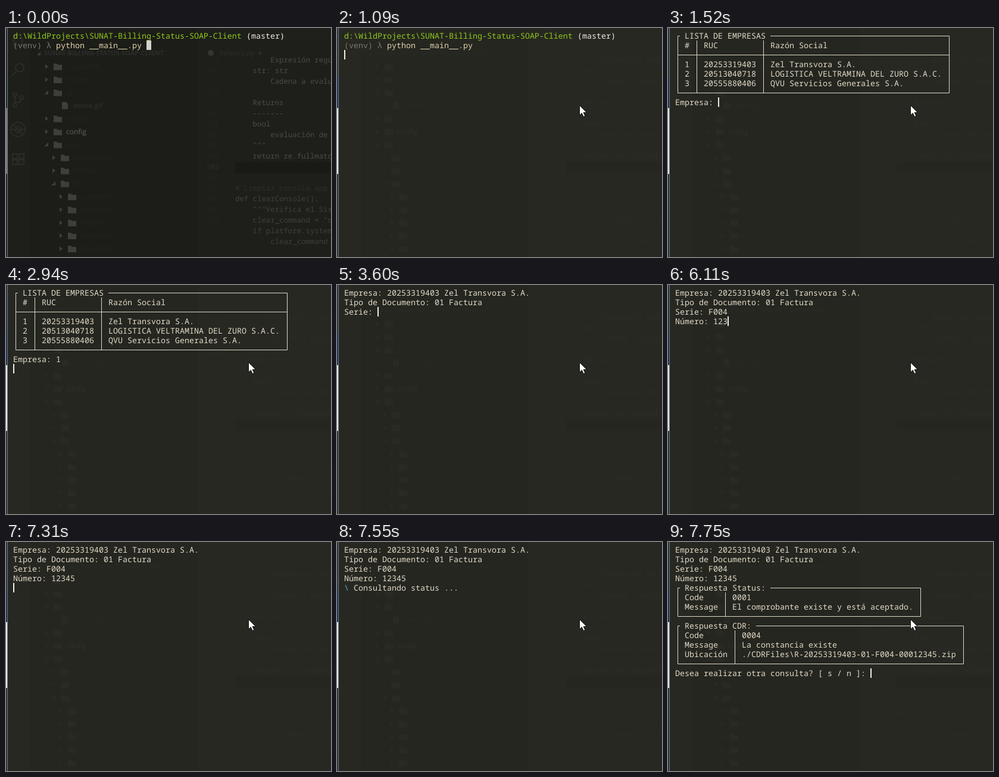
Animation of 546x386 px, one loop 8000 ms. Source, as an HTML page:

```html
<!DOCTYPE html>
<html lang="es">
<head>
<meta charset="utf-8">
<title>Consulta de comprobantes</title>
<style>
  html, body { margin: 0; width: 100%; height: 100%; overflow: hidden; background: #272822; }
  svg { display: block; }
  text { white-space: pre; font-family: "Noto Sans Mono", monospace; text-rendering: geometricPrecision; }
  #screen { font-size: 13.3333px; }
  #code text { font-size: 12.35px; }
  #tree text { font-family: "Open Sans", sans-serif; font-size: 12px; }
  #tree .root { font-size: 11px; font-weight: 700; }
</style>
</head>
<body>
<svg width="546" height="386" viewBox="0 0 546 386">
  <rect id="shade" width="546" height="386"/>
  <g id="ghost">
    <path d="M40 0h282v386h-282z" fill="#1c1d19"/>
    <path d="M385 226h161v19h-161z" fill="#191a16"/>
    <g fill="none" stroke="#2b2c27" stroke-width="2">
      <path d="M13 11h9l5 5v13h-14z"/>
      <circle cx="23" cy="67" r="7"/><path d="M18 72l-9 10"/>
      <circle cx="15" cy="112" r="3"/><circle cx="15" cy="130" r="3"/><circle cx="26" cy="117" r="3"/>
      <path d="M15 115v12M26 120q0 5-11 6"/>
      <circle cx="20" cy="171" r="12"/><circle cx="20" cy="171" r="5"/><path d="M12 163l16 16M9 171h22"/>
      <path d="M11 212h8v8h-8zM11 222h8v8h-8zM22 222h8v8h-8zM22 212h8v8h-8z"/>
    </g>
    <g id="tree"></g>
    <g id="code"></g>
    <circle cx="344" cy="42" r="5" fill="#34352f"/>
    <circle cx="466" cy="15" r="5" fill="#23241f"/>
  </g>
  <g id="edge">
    <path d="M0 0h2v386h-2z" fill="#2c333b"/>
    <path d="M0 81h2v54h-2z" fill="#1b3654"/>
    <path d="M0 135h2v111h-2z" fill="#e2e8e8"/>
  </g>
  <path d="M2.5 0v386" stroke="#6c7785"/>
  <g id="screen"></g>
  <path id="pointer" d="M407.5 130.5v16.5l3.8-3.6 2.8 6.1 2.7-1.2-2.7-5.9h5.3z" fill="#fff" stroke="#111"/>
</svg>
<script>
const LOOP = 8000;
const INK = '#e1d9c6', GREEN = '#8fc91a', GREY = '#77776c', SAND = '#dfd0aa', BLUE = '#62a5c9';
const $ = id => document.getElementById(id);
const esc = s => s.replace(/&/g, '&amp;').replace(/</g, '&lt;');
const label = (x, y, s, fill, attrs = '') =>
  `<text x="${x}" y="${y}" fill="${fill}" ${attrs}>${esc(s)}</text>`;

// Faint editor behind the terminal: [indent level, name, tint]
const FAINT = '#23241f', DIM = '#2d2e29', ICON = '#3e3f39';
const tree = [
  [0, '__pycache__'], [0, 'models'], [0, 'art'], [1, 'demo.gif', '#33342e'], [0, 'models'],
  [0, 'config', '#63645b'], [0, 'venv'], [1, 'services.doc'], [1, 'Include'], [1, 'Lib'],
  [2, '__pycache__'], [2, 'collections'], [2, 'helpers'], [2, 'mappings'], [2, 'importlib']
];
const isFile = name => name.includes('.gif');
$('tree').innerHTML = label(64, 46, 'SUNAT-BILLING-STATUS-SOAP-CLIENT', DIM, 'class="root"') +
  label(359, 46, 'helpers.py  ●', DIM) + label(477, 19, 'SUNATServices.py', FAINT) +
  `<path d="M58 40v6h-6z" fill="${ICON}"/>` +
  tree.map(([level, name, tint = FAINT], i) => {
    const x = 80 + level * 12, y = 65 + i * 21.93;
    const open = tree[i + 1]?.[0] > level;
    const arrow = open ? `M${x - 9} ${y - 4}v7h-7z` : `M${x - 14} ${y - 4}l5 4-5 4z`;
    const icon = isFile(name) ? `M${x + 2} ${y - 6}h7l3 3v9h-10z`
      : `${arrow}M${x} ${y - 5}h5l2 2h7v9h-14z`;
    return `<path d="${icon}" fill="${ICON}"/>` + label(x + 21, y + 4, name, tint);
  }).join('');

const FIRST_LINE = 95, CURRENT_LINE = 105;
const code = [
  '        Expresión regular', '    str: str', '        Cadena a evaluar', '', '    Returns',
  '    -------', '    bool', '        evaluación de la', '    """', '    return re.fullmatch(', '', '',
  '# Limpiar consola app', 'def clearConsole():', '    """Verifica el Sistema',
  '    clear_command = "clear"', '    if platform.system() ==', '        clear_command = "cls"'
];
$('code').innerHTML = code.map((s, i) => {
  const y = 58 + i * 18, line = FIRST_LINE + i;
  return label(358, y, String(line), line === CURRENT_LINE ? DIM : FAINT, 'text-anchor="end"') +
    label(385, y, s, s.startsWith('#') ? DIM : i < 10 ? '#4a4b43' : '#3f403a');
}).join('');

// Terminal grid: 8 x 16 cells
const px = col => 12 + col * 8, py = row => 5 + row * 16;
const midX = col => px(col) + 4.5, midY = row => py(row) + 8.5;
const put = (row, s, col = 0, fill = INK) => label(px(col), py(row) + 13, s, fill);
const cursor = (col, row, width = 2, fill = '#eeeee6') =>
  `<rect x="${px(col)}" y="${py(row)}" width="${width}" height="16" fill="${fill}"/>`;

function table(top, title, rows, header = false) {
  const bottom = top + rows.length + (header ? 2 : 1);
  const rowAt = i => top + 1 + i + (header && i ? 1 : 0);
  let col = 2, out = put(top, title, 2), seps = '';
  rows[0].forEach((_, c) => {
    out += rows.map((r, i) => put(rowAt(i), r[c], col)).join('');
    const edge = col + Math.max(...rows.map(r => r[c].length)) + 1;
    if (c < rows[0].length - 1) seps += `M${midX(edge)} ${py(top + 1)}V${midY(bottom)}`;
    col = edge + 2;
  });
  const left = midX(0), right = midX(col - 2);
  const rule = header ? `M${left} ${midY(top + 2)}H${right}` : '';
  return out + `<path fill="none" stroke="${INK}" d="M${px(1)} ${midY(top)}H${left}V${midY(bottom)}H${right}` +
    `V${midY(top)}H${px(title.length + 3)}${seps}${rule}"/>`;
}

const ask = (body, row, prompt, value = '', showCursor = true) =>
  body + put(row, prompt + value) + (showCursor ? cursor(prompt.length + value.length, row) : '');
const enter = (body, row, s) => body + put(row, s) + cursor(0, row + 1);

const RUC = '20253319403', COMPANY = 'Zel Transvora S.A.';
const shell = put(0, 'd:\\WildProjects\\SUNAT-Billing-Status-SOAP-Client', 0, GREEN) +
  put(0, '(master)', 49, '#f0eadb') + put(1, '(venv) λ', 0, GREY) + put(1, 'python __main__.py', 9, SAND);
const companies = table(0, 'LISTA DE EMPRESAS', [
  ['#', 'RUC', 'Razón Social'],
  ['1', RUC, COMPANY],
  ['2', '20513040718', 'LOGISTICA VELTRAMINA DEL ZURO S.A.C.'],
  ['3', '20555880406', 'QVU Servicios Generales S.A.']
], true);
const company = put(0, `Empresa: ${RUC} ${COMPANY}`);
const kinds = company + table(1, 'TIPOS DE DOCUMENTO', [
  ['#', 'Id', 'Descripción'],
  ['1', '01', 'Factura'],
  ['2', '03', 'Boleta de Venta'],
  ['3', '07', 'Nota de Crédito'],
  ['4', '08', 'Nota de Débito']
], true);
const kind = company + put(1, 'Tipo de Documento: 01 Factura');
const serie = kind + put(2, 'Serie: F004');
const numbered = serie + put(3, 'Número: 12345');
const spin = glyph => numbered + put(4, glyph, 0, BLUE) + put(4, 'Consultando status ...', 2);
const result = numbered + table(4, 'Respuesta Status:', [
  ['Code', '0001'],
  ['Message', 'El comprobante existe y está aceptado.']
]) + table(8, 'Respuesta CDR:', [
  ['Code', '0004'],
  ['Message', 'La constancia existe'],
  ['Ubicación', `./CDRFiles\\R-${RUC}-01-F004-00012345.zip`]
]);
const typing = (body, row, prompt, value, times) =>
  times.map((at, i) => [at, ask(body, row, prompt, value.slice(0, i + 1))]);

const steps = [
  [0, shell + cursor(28, 1, 8, '#d2d2ca')],
  [100, shell + cursor(28, 1)],
  [970, shell],
  [1090, shell + cursor(0, 2)],
  [1520, ask(companies, 7, 'Empresa: ')],
  [2070, ask(companies, 7, 'Empresa: ', '', false)],
  [2620, ask(companies, 7, 'Empresa: ', '1')],
  [2940, enter(companies, 7, 'Empresa: 1')],
  [3070, ask(kinds, 9, 'Tipo de Documento: ')],
  [3370, ask(kinds, 9, 'Tipo de Documento: ', '1')],
  [3600, ask(kind, 2, 'Serie: ')],
  [4130, ask(kind, 2, 'Serie: ', '', false)],
  ...typing(kind, 2, 'Serie: ', 'F004', [4350, 4580, 4800, 5020]),
  [5340, ask(serie, 3, 'Número: ')],
  ...typing(serie, 3, 'Número: ', '12345', [5560, 5790, 6110, 6660, 6880]),
  [7310, numbered + cursor(0, 4)],
  [7430, spin('-')],
  [7550, spin('\\')],
  [7650, spin('|')],
  [7750, ask(result, 13, 'Desea realizar otra consulta? [ s / n ]: ')]
];

// Window focus: the terminal turns opaque in four steps
const fadeTimes = [100, 210, 330, 440];
const mix = (a, b, k) => a + (b - a) * k;
let shown = -1;

function frame() {
  const t = performance.now() % LOOP;
  const focus = fadeTimes.filter(at => t >= at).length / fadeTimes.length;
  const index = steps.filter(([at]) => t >= at).length - 1;
  if (index !== shown) $('screen').innerHTML = steps[shown = index][1];
  $('shade').setAttribute('fill', `rgb(${mix(30, 39, focus)},${mix(31, 40, focus)},${mix(27, 34, focus)})`);
  $('ghost').setAttribute('opacity', mix(1, .12, focus));
  $('edge').setAttribute('opacity', mix(.45, 1, focus));
  $('pointer').setAttribute('visibility', t >= 100 ? 'visible' : 'hidden');
  requestAnimationFrame(frame);
}
frame();
</script>
</body>
</html>
```
